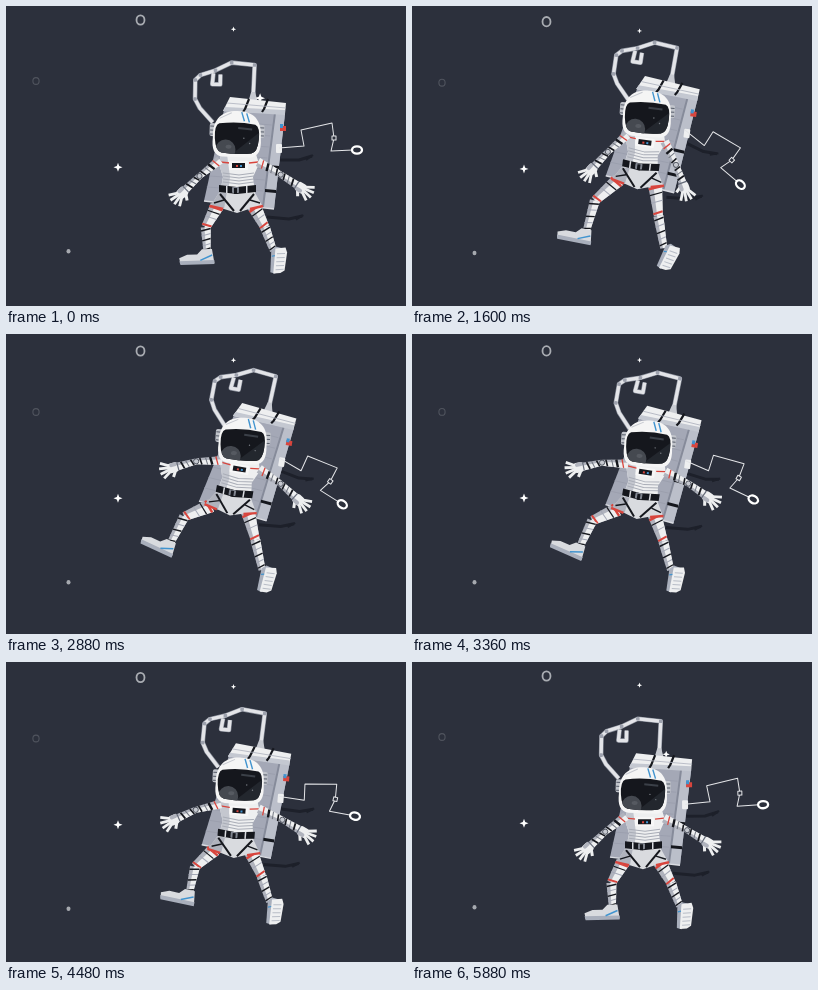
An HTML page with a canvas for the animation above (5960 ms loop, 400 by 300 pixels).

```html
<!DOCTYPE html>
<html lang="en">
<head>
<meta charset="utf-8">
<title>Floating astronaut</title>
<style>
html, body { margin: 0; width: 100%; height: 100%; overflow: hidden; background: #2c303c; }
canvas { display: block; }
</style>
</head>
<body>
<canvas id="stage" width="400" height="300"></canvas>
<script>
const ctx = document.getElementById('stage').getContext('2d');
const LOOP = 5960, TIMES = [0, 800, 1600, 2880, 3840, 5120];
const SKY = '#2c303c', WHITE = '#eeeff0', LIGHT = '#d9dbdf', SHADE = '#b0b3bd', GREY = '#a4a8b6';
const DARK = '#15171d', RED = '#d8453d', BLUE = '#4194cf';
const RAD = Math.PI / 180;

// The whole rig follows three curves.
const LIFT = [0, .33, .88, 1, .7, .2];            // rise and lean of the body
const STEP = [0, .55, .12, -.19, -.21, -.06];     // legs stretching down
const REACH = [0, -.45, -.1, .95, 1, .25];        // arms spreading

// Smooth cyclic interpolation.
function follow(values, t) {
  const n = TIMES.length;
  const time = k => TIMES[(k + n) % n] + Math.floor(k / n) * LOOP;
  const value = k => values[(k + n) % n];
  let i = n - 1;
  while (TIMES[i] > t) i--;
  const span = time(i + 1) - time(i), u = (t - time(i)) / span;
  const slope = k => (value(k + 1) - value(k - 1)) / (time(k + 1) - time(k - 1)) * span;
  const a = value(i), b = value(i + 1), m = slope(i), d = slope(i + 1);
  return a + u * (m + u * (3 * (b - a) - 2 * m - d + u * (2 * (a - b) + m + d)));
}

const mix = (a, b, u) => a + (b - a) * u;

function trace(p) {
  ctx.beginPath();
  for (let i = 0; i < p.length; i += 2) ctx.lineTo(p[i], p[i + 1]);
}
function poly(color, ...p) {
  trace(p);
  ctx.fillStyle = color;
  ctx.fill();
}
function line(color, width, ...p) {
  trace(p);
  ctx.strokeStyle = color;
  ctx.lineWidth = width;
  ctx.stroke();
}
function rect(color, x, y, w, h, r = 0) {
  ctx.beginPath();
  ctx.roundRect(x, y, w, h, r);
  ctx.fillStyle = color;
  ctx.fill();
}
function oval(x, y, rx, ry, fill, stroke, width) {
  ctx.beginPath();
  ctx.ellipse(x, y, rx, ry, 0, 0, 7);
  if (fill) { ctx.fillStyle = fill; ctx.fill(); }
  if (stroke) { ctx.strokeStyle = stroke; ctx.lineWidth = width; ctx.stroke(); }
}
function place(x, y, degrees, draw) {
  ctx.save();
  ctx.translate(x, y);
  ctx.rotate(degrees * RAD);
  draw();
  ctx.restore();
}
function sparkle(x, y, r) {
  const p = [];
  for (let k = 0; k < 8; k++) {
    const d = k % 2 ? r * .38 : r, a = k * Math.PI / 4;
    p.push(x + d * Math.cos(a), y + d * Math.sin(a));
  }
  poly('#fff', ...p);
}

// Tapered limb; bands are [position, thickness, color] along its length.
function limb([x, y], [x2, y2], w, w2, bands) {
  const len = Math.hypot(x2 - x, y2 - y);
  place(x, y, Math.atan2(y2 - y, x2 - x) / RAD, () => {
    poly(SHADE, 0, -w / 2, len, -w2 / 2, len, w2 / 2, 0, w / 2);
    poly(WHITE, 0, -w / 2, len, -w2 / 2, len, w2 / 8, 0, w / 8);
    for (const [u, size, color] of bands) {
      const h = mix(w, w2, u) / 2;
      line(color, size, len * u - 1, -h, len * u + 1, h);
    }
  });
}
// End of a bone swung outward from straight down; side is -1 left, 1 right.
const bone = ([x, y], side, degrees, len) =>
  [x + side * len * Math.sin(degrees * RAD), y + len * Math.cos(degrees * RAD)];

function drawSky(t) {
  ctx.fillStyle = SKY;
  ctx.fillRect(0, 0, 400, 300);
  place(0, 1.5 * (1 - Math.cos(2 * Math.PI * t / LOOP)), 0, () => {
    oval(134.5, 14, 4, 4.7, null, '#a9acb2', 1.8);
    oval(30, 75, 3.1, 3.4, null, '#50545e', 1.1);
    oval(62.5, 245.3, 2, 2.2, '#a6a9af');
    sparkle(227.5, 23.2, 2.6);
    sparkle(112, 161.2, 4.5);
  });
}

function drawTube(glint) {
  const pipe = [-40, 23, -53, 9, -58, 0, -58, -19, -53, -24, -38, -29, -22, -37, 1, -35, 0, 0];
  const hook = [-40, -26, -41, -15, -33, -15, -33, -25];
  for (const [color, w] of [['#8b909c', 4.6], ['#e3e4e8', 3.4]]) {
    line(color, w, ...pipe);
    line(color, w, ...hook);
  }
  for (let i = 4; i < 16; i += 2) rect('#9da1ad', pipe[i] - 1.8, pipe[i + 1] - 1.8, 3.6, 3.6, 1);
  poly('#c7cad1', -2, -8, 2, -8, 5, 3, -5, 3);
  if (glint > 0) sparkle(7, -2, 5 * glint);
}

function drawWire() {
  line('#e4e5e8', 1, 0, 0, 25, -2, 22, -18, 53, -25, 55, -10, 52, 3, 74, 2);
  rect(SKY, 53, -12, 4, 4);
  ctx.strokeRect(53, -12, 4, 4);
  oval(78, 2, 5, 3.6, SKY, '#fff', 2.3);
}

function drawShadow() {
  line('#1d202a', 3, 0, 0, 22, 0, 35, -4);
  line('#1d202a', 2, 29, 0, 36, -5);
}

function drawPack() {
  poly(GREY, -13, -79, 48, -75, 37, 20, -33, 12);
  poly('#bbbfca', 38, -76, 48, -75, 37, 20, 26, 18);
  poly('#868b9a', 37, -76, 39, -76, 27, 18, 25, 18);
  for (let k = 1; k < 8; k++) line('#9a9eac', .8, -12 - 2.6 * k, -79 + 11 * k, 36 - 1.4 * k, -75 + 11 * k);
  line('#d9dbe1', 1.4, -33, 12, 37, 20);
  poly(DARK, 31, -24, 42, -23, 42, -20, 31, -21);
  poly(DARK, 28, 0, 39, 1, 39, 4, 28, 3);
  rect(RED, 43, -63, 6, 5);
  rect(BLUE, 43, -65, 3, 4);
  rect(WHITE, 39, -45, 6, 9, 1);
  poly(WHITE, -14, -78, -7, -92, 49, -86, 48, -75);
  poly('#c4c8d1', -14, -78, -12, -82, 48, -79, 48, -74);
  for (const x of [6, 25]) line(DARK, 2.2, x, -77, x + 2, -80, x + 6, -90);
  line('#aeb2be', .8, -10, -86, 49, -81);
}

function drawHand([ex, ey], [x, y], side) {
  place(x, y, Math.atan2(y - ey, x - ex) / RAD, () => {
    line(WHITE, 3, -3, 3 * side, 1, 9 * side);
    for (let a = -.65; a < .8; a += .43)
      line(WHITE, 2.8, 2 * Math.cos(a), 4 * Math.sin(a), 13 * Math.cos(a), 13 * Math.sin(a));
    rect(WHITE, -6, -5, 10, 10, 3);
    rect(SHADE, -6, 1, 8, 4, 2);
    line('#646a78', 1.2, -6, -4, -6, 4);
  });
}

function drawArm(shoulder, side, upper, fore) {
  const elbow = bone(shoulder, side, upper, 26), palm = bone(elbow, side, fore, 25);
  const cuff = bone(elbow, side, fore, 20);
  limb(shoulder, elbow, 9, 6, [[.2, 1.3, RED], [.42, 2.4, DARK], [.6, 1, '#70757f'], [.82, 1.6, DARK]]);
  limb(elbow, cuff, 6, 8, [[.2, 1.6, DARK], [.45, 1, '#70757f'], [.7, 1.8, DARK]]);
  oval(...elbow, 2.6, 2.6, '#c6c9d0', '#363b47', .8);
  drawHand(elbow, palm, side);
}

// Draws a leg and returns its ankle.
function drawLeg(hip, side, thigh, shin, stretch) {
  const knee = bone(hip, side, thigh, 24 * stretch), ankle = bone(knee, side, shin, 25 * stretch);
  limb(hip, knee, 14, 9, [[.1, 2.4, RED], [.3, 1.2, DARK], [.55, 1, GREY], [.9, 2, RED]]);
  limb(knee, ankle, 10, 7, [[.1, 1.5, DARK], [.3, 1, GREY], [.5, 1.4, DARK], [.7, 1, GREY], [.88, 1.3, DARK]]);
  return ankle;
}
function drawShoe() {
  poly(LIGHT, -5, -3, 5, -3, 7, 11, -27, 11, -28, 5, -20, 2, -10, 2);
  poly('#a9afbc', 7, 8, 7, 12, -27, 12, -28, 8);
  line(BLUE, 1.5, -7, 8, 5, 3);
}
function drawSole() {
  poly('#a9afbc', -8, -9, -4, -13, 2, -12, -2, 14, -7, 13);
  poly(WHITE, -4, -11, 6, -13, 8, -8, 7, 10, 3, 13, -4, 14);
  for (let y = -7; y < 11; y += 4) line('#b7bcc6', 1, -2, y + 1, 6, y);
  line(BLUE, 1.2, -7, -3, -4, -4);
}

function drawTorso() {
  poly(LIGHT, -17, 2, 17, 2, 26, 18, 12, 20, 0, 24, -13, 20, -27, 18);
  poly(SHADE, -17, 2, -10, 2, -13, 20, -27, 18);
  line(RED, 2.4, -27, 17, -14, 20);
  line(RED, 2.4, 26, 17, 13, 20);
  for (const side of [-1, 1]) {
    line(DARK, 2, 17 * side, 5, 3 * side, 22);
    line(DARK, 1.4, 13 * side, 11, 23 * side, 14);
  }
  poly(WHITE, -16, -35, 19, -35, 22, -25, 16, -12, 18, 4, -17, 4, -14, -12, -18, -25);
  poly('#c4c7cf', -16, -35, -10, -35, -7, -12, -9, 4, -17, 4, -14, -12, -18, -25);
  for (let y = -16; y < -4; y += 3) line('#a9adb7', 1, -14, y, 2, y + 2, 17, y);
  line(RED, 1.3, -17, -27, -7, -26);
  line(RED, 1.3, 12, -26, 21, -27);
  rect('#f7f7f7', -8, -28, 19, 9, 1);
  rect(DARK, -5, -26, 13, 5);
  rect(RED, -1, -24, 2, 2);
  rect(BLUE, 3, -24, 2, 2);
  poly(DARK, -18, -4, 0, -2, 19, -4, 19, 3, 0, 5, -18, 3);
  rect('#d9dbe0', -11, -3, 1.5, 7);
  rect('#d9dbe0', 9, -3, 1.5, 7);
  rect('#80858f', -5, -2, 7, 6, 1);
  rect(DARK, -3, -1, 3, 6);
}

function drawHead() {
  for (const side of [-1, 1]) {
    rect('#c1c4cb', side * 24 - 3.5, -10, 7, 13, 2);
    for (const y of [-7, -3, 1]) line('#555b68', 1, side * 24 - 3, y, side * 24 + 3, y);
  }
  ctx.beginPath();
  ctx.moveTo(-24, 4);
  ctx.bezierCurveTo(-25, -16, -14, -23, 0, -23);
  ctx.bezierCurveTo(15, -23, 25, -16, 24, 4);
  ctx.bezierCurveTo(25, 16, 22, 22, 14, 23);
  ctx.lineTo(-14, 23);
  ctx.bezierCurveTo(-22, 22, -25, 16, -24, 4);
  ctx.fillStyle = '#f5f5f5';
  ctx.fill();
  line(BLUE, 1.4, 4, -22, 7, -13);
  line(BLUE, 1.4, 9, -21, 12, -12);
  line('#c6c9d0', 1, -18, -15, -6, -21);

  ctx.save();
  ctx.beginPath();
  ctx.moveTo(-18, -10);
  ctx.quadraticCurveTo(0, -13, 18, -10);
  ctx.quadraticCurveTo(23, -8, 22, 5);
  ctx.quadraticCurveTo(21, 18, 15, 19);
  ctx.quadraticCurveTo(0, 21, -15, 19);
  ctx.quadraticCurveTo(-21, 18, -22, 5);
  ctx.quadraticCurveTo(-23, -8, -18, -10);
  ctx.fillStyle = DARK;
  ctx.fill();
  ctx.clip();
  poly('#23272e', 22, -2, 22, 20, -4, 20);
  oval(-11, 16, 10, 10, '#454950');
  oval(-8, 13, 3, 2, '#565a61');
  line('#3b4048', 2, 1, -6, 15, -5);
  oval(7, 4, .7, .7, '#777b82');
  oval(13, 9, .7, .7, '#777b82');
  ctx.restore();
}

function draw(t) {
  const lift = follow(LIFT, t), step = follow(STEP, t), reach = follow(REACH, t);
  const swing = lift + step, stretch = 1 + .3 * lift + .38 * step;
  const x = 231 - 3 * lift, y = 183 - 26 * lift - 5 * step, lean = 9 * lift - 4 * step;
  const c = Math.cos(lean * RAD), s = Math.sin(lean * RAD);
  const onBody = (u, v) => [x + u * c - v * s, y + u * s + v * c];
  const behind = (u, v, turn, part) => place(...onBody(u, v), turn, part);

  drawSky(t);
  behind(40, -29, 26 * swing, drawShadow);
  behind(30, 28, 5, drawShadow);
  behind(16 + 4 * lift, -89 + 3 * lift, lean + 1, () => drawTube(1 - Math.min(t, LOOP - t) / 300));
  behind(0, 3 * lift, lean, drawPack);
  behind(42 - 3 * lift, -41, 43 * swing, drawWire);

  const heel = drawLeg(onBody(-20, 17), -1, 28 + 30 * lift - 50 * step, -3 + 25 * lift - 28 * step, stretch);
  place(...heel, -2 + 20 * lift - 36 * step, drawShoe);
  const ankle = drawLeg(onBody(17, 17), 1, 27 - 19 * lift - 35 * step, 20 - 10 * lift - 14 * step, stretch);
  place(ankle[0] + 5, ankle[1] + 9, 5 + 18 * lift + 45 * step, drawSole);

  place(x, y, lean, drawTorso);
  drawArm(onBody(-17, -29), -1, 52 + 38 * reach, 46 + 30 * reach);
  drawArm(onBody(21, -27), 1, 61 - 33 * swing + 22 * reach, 57 - 35 * swing + 20 * reach);
  place(...onBody(0, -55 + 3 * lift), 2 + 2 * lift, drawHead);
}

ctx.lineJoin = 'round';
const start = performance.now();
function tick() {
  draw((performance.now() - start) % LOOP);
  requestAnimationFrame(tick);
}
tick();
</script>
</body>
</html>
```
